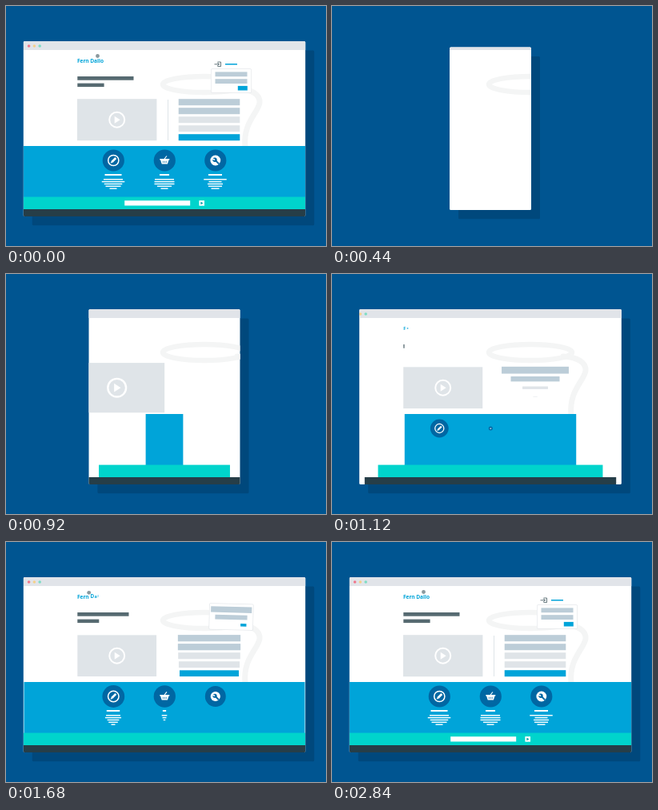
An HTML page with a canvas that plays this animation: 400x300 px, repeating every 4840 ms.

```html
<!DOCTYPE html>
<html lang="en">
<head>
<meta charset="utf-8">
<title>Web page assembling itself</title>
<style>
html, body { margin: 0; width: 100%; height: 100%; overflow: hidden; background: #005591; }
canvas { display: block; width: 100%; height: 100%; }
</style>
</head>
<body>
<canvas width="400" height="300"></canvas>
<script>
const LOOP = 4840, SETTLED = 2840;
const BLUE = '#00a4d9', TEAL = '#00d4cc', NAVY = '#0067a3', SLATE = '#566a71',
      STEEL = '#bccdd8', PALE = '#dfe4e8';
const ctx = document.querySelector('canvas').getContext('2d');
let now = 0;

const clamp = v => Math.min(1, Math.max(0, v));
const progress = (start, length) => clamp((now - start) / length);
const easeOut = (start, length = 1000) => 1 - (1 - progress(start, length)) ** 3.4;
const easeInOut = (start, length) => {
  const u = progress(start, length);
  return u < .5 ? 4 * u ** 3 : 1 - 4 * (1 - u) ** 3;
};
const spring = start => {
  const dt = now - start;
  return dt <= 0 ? 0 : 1 - Math.exp(-.0055 * dt) * Math.cos(.0135 * dt);
};

function rect(x, y, w, h, color) {
  ctx.fillStyle = color;
  ctx.fillRect(x, y, w, h);
}

function roundRect(x, y, w, h, r, color) {
  ctx.beginPath();
  ctx.roundRect(x, y, w, h, r);
  ctx.fillStyle = color;
  ctx.fill();
}

function disc(x, y, r, color) {
  ctx.beginPath();
  ctx.arc(x, y, r, 0, 7);
  ctx.fillStyle = color;
  ctx.fill();
}

function stroke(path, color, width) {
  ctx.strokeStyle = color;
  ctx.lineWidth = width;
  ctx.stroke(new Path2D(path));
}

function fill(path, color) {
  ctx.fillStyle = color;
  ctx.fill(new Path2D(path));
}

// Runs draw in a coordinate system centred on (x, y).
function at(x, y, scale, draw, angle = 0) {
  if (scale <= 0) return;
  ctx.save();
  ctx.translate(x, y);
  ctx.rotate(angle);
  ctx.scale(scale, scale);
  draw();
  ctx.restore();
}

const centredBar = (x, y, w, h, color, grow) => rect(x - w * grow / 2, y, w * grow, h, color);

function drawRope() {
  ctx.lineCap = 'round';
  stroke('M196 98a52 10 0 0 1 104 0a52 10 0 0 1 -104 0', '#f4f5f5', 6.5);
  stroke('M289 103C306 104 318 110 317 121C315 134 296 146 299 176', '#f4f5f5', 7);
  ctx.lineCap = 'butt';
}

function drawLogo() {
  const name = 'Fern Dallo';
  ctx.font = 'bold 6.6px "Open Sans", sans-serif';
  ctx.textAlign = 'center';
  const fit = ctx.measureText(name).width;
  const gap = (33 - fit) / name.length;
  let x = 89;
  [...name].forEach((letter, i) => {
    const w = ctx.measureText(letter).width;
    at(x + w / 2, 68, easeOut(925 + 93 * i, 500), () => {
      ctx.fillStyle = BLUE;
      ctx.fillText(letter, 0, 2.6);
    });
    x += w + gap;
  });
  const slide = easeInOut(1150, 1130), back = easeInOut(2280, 560);
  const markX = 90 + 33 * slide - 8.5 * back;
  const markY = 63 + 5 * slide ** 3 - 5.5 * back;
  disc(markX, markY, 2.4 * easeOut(1150, 300), '#8b999e');
}

function drawVideo() {
  at(138.7, 142.2, spring(770), () => {
    rect(-49.7, -26, 99.4, 52, PALE);
    stroke('M-9.5 0a9.5 9.5 0 0 1 19 0a9.5 9.5 0 0 1 -19 0', '#fff', 2);
    fill('M-3 -4.5L4 0L-3 4.5Z', '#fff');
  });
}

function drawForm() {
  [STEEL, STEEL, PALE, PALE, BLUE].forEach((color, i) =>
    at(254, 120.2 + 11 * i, spring(990 + 40 * i), () => rect(-38.3, -4, 76.6, 8, color)));
  const h = 51 * easeOut(1720, 800);
  rect(202, 142.5 - h / 2, 1, h, PALE);
}

function drawLogin() {
  const size = spring(1370);
  at(281.5, 93.5, size, () => {
    roundRect(-25.5, -15.3, 51, 30.6, 1.5, '#e6e9ec');
    roundRect(-24.8, -14.6, 49.6, 29.2, 1, '#fff');
    at(0, -8.2, spring(1535), () => rect(-20, -2.9, 40, 5.8, STEEL));
    at(0, .6, spring(1575), () => rect(-20, -2.9, 40, 5.8, STEEL));
    at(14.3, 9.2, spring(1615), () => rect(-6, -2.8, 12, 5.6, BLUE));
  }, (size - 1) * .3);
  at(264.5, 72.8, spring(1720), () => {
    stroke('M-4 0H2M-.3 -2L2 0L-.3 2M0 -2.8H4V2.8H0', SLATE, .9);
  });
  rect(274, 72, 15 * easeOut(1800, 800), 1.5, BLUE);
}

const icons = [
  () => {
    stroke('M-6.6 0a6.6 6.6 0 0 1 13.2 0a6.6 6.6 0 0 1 -13.2 0', '#fff', 1.5);
    stroke('M-2 2L3 -3', '#fff', 2.6);
    fill('M-3.6 3.6L-3 1.2L-1.2 3Z', '#fff');
  },
  () => {
    fill('M-6 -2H6V-.6H5.2L3.6 4.6H-3.6L-5.2 -.6H-6Z', '#fff');
    stroke('M-.5 -1.5L2.6 -5.5', '#fff', 1.2);
    stroke('M-2 .8V3M0 .8V3M2 .8V3', NAVY, .7);
  },
  () => {
    disc(0, 0, 6.4, '#fff');
    disc(-.8, -.8, 2.7, NAVY);
    stroke('M0 0L4.4 4.4', NAVY, 2);
    stroke('M-.8 -.8L-4 -2', '#fff', 1.5);
  }
];

const columns = [
  { x: 134, widths: [21, 24, 28.5, 22.5, 19, 9] },
  { x: 198, widths: [12, 24, 25, 25, 18, 9] },
  { x: 261.5, widths: [17, 28.5, 16, 19, 17, 10] }
];

function drawFeatures() {
  columns.forEach(({ x, widths }, col) => {
    at(x + .3, 193, spring(1025 + 70 * col), () => {
      disc(0, 0, 13.6, NAVY);
      icons[col]();
    });
    widths.forEach((w, i) => {
      const y = i ? 213.2 + 2.85 * i : 210;
      centredBar(x, y, w, i ? 1.4 : 2, '#fff', easeOut(1320 + 240 * col + 30 * i));
    });
  });
}

function drawBands() {
  centredBar(198, 175, 352.5, 64, BLUE, easeOut(880));
  centredBar(198, 238.6, 352.5, 15.4, TEAL, easeOut(758, 970));
  centredBar(198, 254, 352.5, 9, '#263e48', easeOut(708, 860));
  drawFeatures();
  centredBar(189.2, 243.2, 82, 6.3, '#fff', easeOut(1740, 700));
  at(244.7, 246.4, spring(1970), () => {
    rect(-3.3, -3.3, 6.6, 6.6, '#fff');
    fill('M-1.3 -1.8L1.7 0L-1.3 1.8Z', '#00a0a8');
  });
}

function drawPage() {
  rect(22, 44, 353, 11, '#e1e4e9');
  ['#f0788c', '#f5d08a', '#7fdcc4'].forEach((color, i) => disc(28.6 + 6.8 * i, 50, 1.8, color));
  drawRope();
  drawLogo();
  rect(89.3, 88, 70.2 * easeOut(1115, 1100), 4.7, SLATE);
  rect(89.3, 96.6, 33.3 * easeOut(1255, 1100), 4.5, SLATE);
  drawVideo();
  drawForm();
  drawLogin();
  drawBands();
}

function draw(time) {
  const t = time % LOOP;
  now = t < 40 || t >= SETTLED ? 1e5 : t;
  rect(0, 0, 400, 300, '#005591');

  const pop = 1 - (1 - progress(30, 170)) ** 3;
  const tall = easeInOut(200, 390);
  const w = 102 * pop + 250.4 * easeInOut(588, 752);
  const h = 150 * pop + 68.8 * tall;
  const x = 198 - w / 2, y = 152.2 + 1.3 * tall - h / 2;

  roundRect(x + 11, y + 11.4, w, h, 1.5, 'rgba(0,20,40,.2)');
  roundRect(x, y, w, h, 1.5, '#fff');
  ctx.save();
  ctx.clip();
  drawPage();
  ctx.restore();
}

const began = performance.now();
function tick() {
  draw(performance.now() - began);
  requestAnimationFrame(tick);
}
tick();
</script>
</body>
</html>
```
